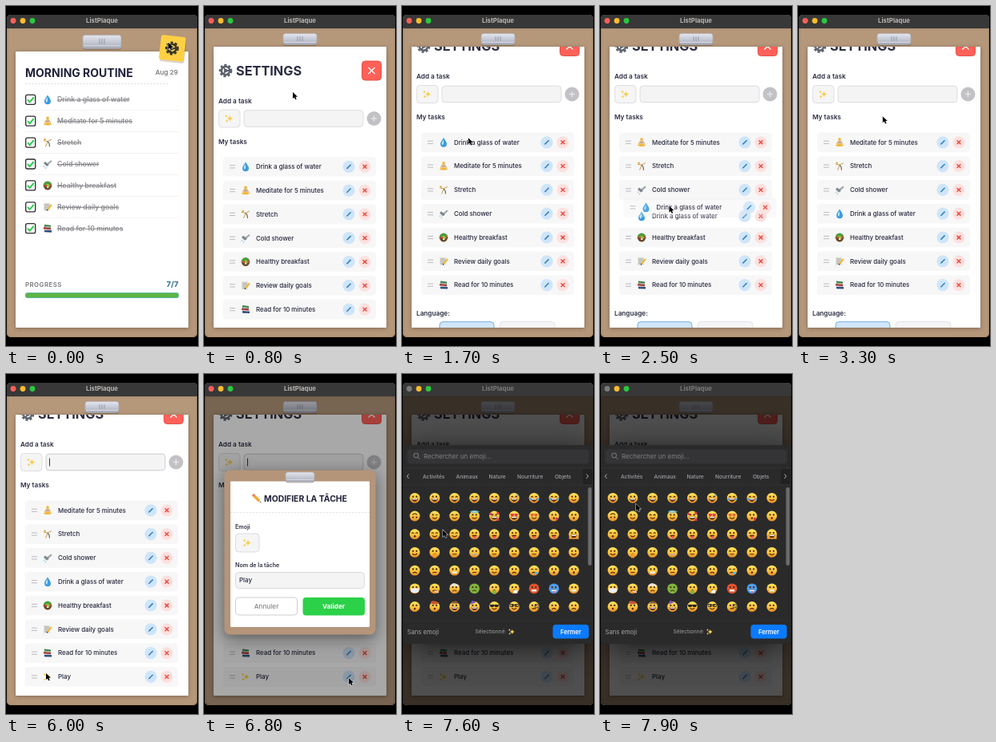
Animation, 240 px wide and 426 px high, one loop 8000 ms. Source, as an HTML page with a canvas:

```html
<!DOCTYPE html>
<html lang="en">
<head>
<meta charset="utf-8">
<title>ListPlaque</title>
<style>
html, body { margin: 0; width: 100%; height: 100%; overflow: hidden; background: #000 }
canvas { display: block; width: 240px; height: 426px }
</style>
</head>
<body>
<canvas id="stage"></canvas>
<script>
const LOOP = 8000, PITCH = 29.8, SCROLL = 30.5;
const canvas = document.getElementById('stage'), c = canvas.getContext('2d');
const dpr = window.devicePixelRatio || 1;
canvas.width = 240 * dpr;
canvas.height = 426 * dpr;

const TASKS = [
  ['drop', 'Drink a glass of water'], ['sit', 'Meditate for 5 minutes'], ['stretch', 'Stretch'],
  ['shower', 'Cold shower'], ['salad', 'Healthy breakfast'], ['memo', 'Review daily goals'],
  ['books', 'Read for 10 minutes']
];

// Each icon is a list of [colour, path, line width (filled when absent)].
const ICONS = {
  drop: [['#3c9be0', 'M0-6C1-3 4-1 4 2A4 4 0 0 1-4 2C-4-1-1-3 0-6'],
    ['#b9e4fb', 'M-.5-3C-2-.5-3 1-2 3C-.5 4 1 1-.5-3']],
  sit: [['#f3b52f', 'M-1.8-3.8a1.8 1.8 0 1 1 3.6 0a1.8 1.8 0 1 1-3.6 0'],
    ['#e9a52b', 'M-1.5-1.5L-3.8 2.5M1.5-1.5L3.8 2.5', 1.1], ['#cfae8a', 'M-1.8-2h3.6l.2 4h-4z'],
    ['#f0b637', 'M-5.5 4Q0 0 5.5 4Q0 6.5-5.5 4']],
  stretch: [['#c99a45', 'M-5-2.5L0-1.5L5-4M0-1L-2.5 5', 1], ['#6a5a40', 'M0-1.5L2 1L2.5 5', 1.1],
    ['#e0a23a', 'M-4.6-4a1.2 1.2 0 1 1 2.4 0a1.2 1.2 0 1 1-2.4 0']],
  shower: [['#9aa3a8', 'M5-4L0 0', 2], ['#7c868b', 'M-3-3L2 1L-1 3L-5-1z'],
    ['#7cc3ea', 'M-4 2l-1 2M-2 4l-1 2', 1]],
  salad: [['#4d9a3d', 'M-5.4 0a5.4 5.4 0 1 1 10.8 0z'], ['#6b4a2c', 'M-5.5 0h11Q4 5.5 0 5.5T-5.5 0'],
    ['#8cc63f', 'M-3.5 1a3.5 3 0 1 1 7 0z'], ['#d8452f', 'M-4-1h3v2h-3zM2-2h2v2h-2z'],
    ['#f5e6b0', 'M-1 1h2.5v2h-2.5z']],
  memo: [['#e4e2d8', 'M-5-5h8v10h-8z'], ['#8b929a', 'M-4-3h6M-4-1h6M-4 1h4M-4 3h3', .7],
    ['#f0b429', 'M5-3L0 3', 2], ['#3d3a36', 'M0 3l-1 1.5', 1.2]],
  books: [['#3f7f4a', 'M-4-5l8 1v3l-8-1z'], ['#a23c36', 'M-5-1.6l9 .8v2.6l-9-.8z'],
    ['#2f4f7c', 'M-4 2l9 .4v2.6l-9-.4z'], ['#ddd', 'M-3-2.6l7 .8M-4 1.2l8 .7', .6]],
  sparkle: [['#f7d057', 'M1-4Q1.6-.6 5 0Q1.6.6 1 4Q.4.6-3 0Q.4-.6 1-4M-3.5-5Q-3.2-3.3-1.5-3Q-3.2-2.7-3.5-1Q-3.8-2.7-5.5-3Q-3.8-3.3-3.5-5M-3 1Q-2.7 2.7-1 3Q-2.7 3.3-3 5Q-3.3 3.3-5 3Q-3.3 2.7-3 1']],
  pencil: [['#f2a633', 'M-3.6-3.6L3 3', 3.4], ['#e6776f', 'M-5-5l1.6 1.6', 3.4], ['#e7c79b', 'M1.8 4l2.2-2.2L5.6 5.6z'],
    ['#333', 'M4 4.8l.8-.8.8 1.6z']]
};

const clamp = v => Math.max(0, Math.min(1, v));
const ease = (t, a, b) => { const k = clamp((t - a) / (b - a)); return k * k * (3 - 2 * k); };

function box(x, y, w, h, r, fill, stroke, lw = 1) {
  c.beginPath();
  c.roundRect(x, y, w, h, r);
  if (fill) { c.fillStyle = fill; c.fill(); }
  if (stroke) { c.strokeStyle = stroke; c.lineWidth = lw; c.stroke(); }
}
function shadowBox(blur, dy, alpha, ...shape) {
  c.save();
  c.shadowColor = `rgba(0,0,0,${alpha})`;
  c.shadowBlur = blur * dpr;
  c.shadowOffsetY = dy * dpr;
  box(...shape);
  c.restore();
}
function text(s, x, y, size, weight, color, align = 'left', spacing = 0) {
  c.font = `${weight} ${size}px Inter, sans-serif`;
  c.letterSpacing = spacing + 'px';
  c.textAlign = align;
  c.fillStyle = color;
  c.fillText(s, x, y + size * .36);
}
function dot(x, y, r, fill) {
  c.beginPath();
  c.arc(x, y, r, 0, 7);
  c.fillStyle = fill;
  c.fill();
}
function path(d, color, width) {
  const p = new Path2D(d);
  c.fillStyle = c.strokeStyle = color;
  c.lineWidth = width || 1;
  width ? c.stroke(p) : c.fill(p);
}
function at(x, y, draw, scale = 1, angle = 0) {
  c.save();
  c.translate(x, y);
  c.scale(scale, scale);
  c.rotate(angle);
  draw();
  c.restore();
}
function fade(alpha, draw) {
  if (alpha <= 0) return;
  c.save();
  c.globalAlpha *= alpha;
  draw();
  c.restore();
}
const icon = (name, x, y, scale = 1) =>
  at(x, y, () => ICONS[name].forEach(([color, d, w]) => path(d, color, w)), scale);
const cross = (x, y, r, color, w) => at(x, y, () => path(`M${-r} ${-r}L${r} ${r}M${r} ${-r}L${-r} ${r}`, color, w));
function dashes(x1, x2, y) {
  c.setLineDash([2.5, 1.5]);
  path(`M${x1} ${y}H${x2}`, '#dcdcdc', .8);
  c.setLineDash([]);
}
function gear(x, y, r, color) {
  at(x, y, () => {
    c.setLineDash([r * .36, r * .267]);
    path(`M${r * .85} 0A${r * .85} ${r * .85} 0 1 1 ${r * .85} -.01`, color, r * .3);
    c.setLineDash([]);
    const q = r * .62;
    path(`M${q} 0A${q} ${q} 0 1 1 ${q} -.01`, color, r * .3);
    path(`M0 0H${q}M0 0L${-q / 2} ${q * .87}M0 0L${-q / 2} ${-q * .87}`, color, r * .22);
    dot(0, 0, r * .28, color);
  });
}
function clip(x, y, w, h, lines) {
  const g = c.createLinearGradient(0, y, 0, y + h);
  g.addColorStop(0, '#e4e6ed');
  g.addColorStop(.55, '#c3c7d3');
  g.addColorStop(1, '#a3a6b2');
  box(x, y + 1.5, w, h, 3, 'rgba(60,40,20,.3)');
  box(x, y, w, h, 3, g, '#a9abb5', .6);
  path(`M${x + 1} ${y + h * .78}H${x + w - 1}`, '#e4e6ee', .8);
  const m = x + w / 2, top = y + h * .27, end = y + h * .66;
  if (lines) path([-3, 0, 3].map(d => `M${m + d} ${top}V${end}`).join(''), '#8d919f', .9);
}
function paper(y) {
  shadowBox(5, 1, .3, 12, y, 216, 403 - y, 1, '#fff');
}

function windowFrame(active) {
  box(1, 11, 238, 404, 5, '#b5977a');
  box(1, 11, 238, 17, [5, 5, 0, 0], '#393838');
  [active ? '#ff5f57' : '#7c7a79', '#febc2e', '#28c840'].forEach((color, i) => dot(9 + 12 * i, 18.5, 3.4, color));
  text('ListPlaque', 120, 18.5, 7.8, 700, active ? '#b9b7b5' : '#7b7a79', 'center');
  box(1.6, 28.5, 236.8, 386, [0, 0, 5, 5], null, '#a5896c', 1.2);
}

function checklist() {
  paper(57);
  clip(96, 36.5, 48, 17, true);
  at(208, 53, () => {
    box(-14.5, -13.5, 31, 31, 3, 'rgba(70,40,0,.2)');
    box(-15.5, -15.5, 31, 31, 3, '#ffd043');
  }, 1, .11);
  gear(207.5, 53, 8.5, '#3c3828');
  text('MORNING ROUTINE', 24, 83.5, 14, 700, '#20223a');
  text('Aug 29', 215, 83.5, 8.2, 500, '#6d6d74', 'right');
  dashes(24, 204, 97.5);
  TASKS.forEach(([name, label], i) => {
    const y = 117.3 + 26.9 * i;
    box(24.7, y - 6, 12, 12, 2, '#fff', '#2c2c30', 1.3);
    path(`M27 ${y}l2.7 3 5-6`, '#2fca50', 2);
    icon(name, 52, y);
    text(label, 64, y, 8.75, 500, '#85858a');
    path(`M64 ${y + .5}h${c.measureText(label).width}`, '#77777c', .9);
    if (i < 6) path(`M24 ${y + 13.4}H216`, '#eeeeef', .8);
  });
  text('PROGRESS', 24, 348.7, 7.8, 600, '#77777d', 'left', .5);
  text('7/7', 215.5, 348.7, 9.6, 700, '#2c6c8c', 'right');
  box(24, 359, 192, 7, 3, '#55b7a2');
  box(24.5, 360, 191, 5, 2.5, '#5db545');
}

function taskRow([name, label], x, y, bg = '#f7f7f8') {
  box(x + 24, y - 12.3, 191, 24.6, 4, bg);
  path(`M${x + 32} ${y - 1.6}h7m-7 3.2h7`, '#b5b5ba', .9);
  icon(name, x + 52, y);
  text(label, x + 65, y, 7.9, 500, '#24263a');
  dot(x + 181, y, 7.6, '#cfe5f9');
  path(`M${x + 178.4} ${y + 2.6}l5.2-5.2`, '#2f7fc4', 1.5);
  dot(x + 201, y, 7.6, '#fde1df');
  cross(x + 201, y, 2.4, '#ee4d43', 1.5);
}

function inputRow(t, y) {
  const typed = t < 5000 ? 'play'.slice(0, Math.max(0, Math.floor((t - 3750) / 130) + 1)) : '';
  const focus = t > 3500;
  box(18.5, y - 11, 26.5, 22, 4, '#f5f5f6', '#dcdce0', .9);
  icon('sparkle', 31.5, y);
  box(50, y - 10.3, 149, 20.6, 4, '#f4f4f5', focus ? '#c6c8cd' : '#dadade', .9);
  text(typed, 54, y, 8, 500, '#24263a');
  const caret = 54.5 + c.measureText(typed).width;
  if (focus && (t + 300) % 1000 < 650) path(`M${caret} ${y - 5}v10`, '#222', .9);
  dot(212.5, y, 9, typed ? '#2fce4c' : '#c2c2c6');
  path(`M209 ${y}h7m-3.5-3.5v7`, typed ? '#fff' : '#e6e6e8', 1.4);
}

function settings(t) {
  const up = SCROLL * ease(t, 1050, 1450), top = 201.3 - up;
  paper(51);
  clip(99, 34.5, 42, 14, true);
  c.save();
  c.beginPath();
  c.rect(12, 51, 216, 352);
  c.clip();
  gear(27, 81 - up, 8.3, '#5d636e');
  text('SETTINGS', 40, 81 - up, 16.3, 700, '#2b2d42');
  box(197.5, 69 - up, 24, 24, 4, '#ff6158', '#e2483f', .9);
  cross(209.5, 81 - up, 4, '#fff', 1.4);
  text('Add a task', 18, 119 - up, 8.2, 600, '#2b2d42');
  inputRow(t, 141 - up);
  text('My tasks', 18, 169.7 - up, 8.2, 600, '#2b2d42');

  const [px, py] = pointer(t), dragging = t > 1900 && t < 2780;
  const dragY = top + py - 169;
  let slot = 0;
  TASKS.forEach((task, i) => {
    if (!i) return;
    const passed = i > 3 ? 0 : t >= 2780 ? 1 : dragging ? clamp((dragY - top - PITCH * (i - .5)) / 7) : 0;
    slot += passed;
    taskRow(task, 0, top + PITCH * (i - passed));
  });
  const held = top + PITCH * slot;
  if (dragging) {
    c.save();
    c.beginPath();
    c.rect(44, held - 12, 180, 26);
    c.clip();
    taskRow(TASKS[0], 0, held + 3, '#fff');
    c.restore();
    fade(.9, () => taskRow(TASKS[0], px - 81, dragY, 'rgba(236,236,238,.35)'));
  } else taskRow(TASKS[0], 0, held);

  const added = ease(t, 5000, 5150);
  fade(added, () => taskRow(['sparkle', 'Play'], 0, top + PITCH * 7));
  const y = 415.5 - up + PITCH * added;
  text('Language:', 18, y, 8.2, 600, '#2b2d42');
  box(47, y + 10.7, 68, 24, 4, '#d2e6f9', '#70aee3', 1);
  box(122, y + 10.7, 69, 24, 4, '#f5f5f6', '#dedee2', .9);
  c.restore();
}

function editDialog() {
  shadowBox(20, 5, .45, 25.5, 120.5, 189, 206, 7, '#b5957a');
  box(33, 134.5, 174, 182.5, 1, '#fff');
  clip(102, 123, 36, 12, false);
  icon('pencil', 66, 156);
  text('MODIFIER LA TÂCHE', 75, 156, 10.4, 700, '#20223a');
  dashes(33, 207, 173.5);
  text('Emoji', 39, 191, 7.1, 600, '#2b2d42');
  box(39.5, 200, 29.5, 23, 4, '#f5f5f6', '#d9d9dd', .9);
  icon('sparkle', 54, 211.5);
  text('Nom de la tâche', 39, 239.7, 7.1, 600, '#2b2d42');
  box(39.5, 248.5, 161, 20, 4, '#f4f4f5', '#d6d6da', .9);
  text('Play', 44, 258.5, 7.9, 500, '#24263a');
  box(39.5, 280, 77, 22, 4, '#fff', '#c9c9ce', .9);
  text('Annuler', 78, 291.2, 8.2, 500, '#85858c', 'center');
  box(123.5, 280, 77.5, 22.5, 4, '#2bd148');
  text('Valider', 162, 291.2, 8.2, 700, '#fff', 'center');
}

// One letter per face: D grin, s smile, t tongue, o kiss, n flat, f frown, g teeth.
const MOUTHS = 'DDDDDDDDs' + 'ssssDDsoo' + 'osstttttD' + 'sonnnnnns' + 'fngnsffoo' + 'nfffoogtg' + 'ooDDssnff';
const SKIN = { 48: '#7fb73c', 51: '#e2532f', 52: '#4d9df0' };
const LIPS = {
  D: ['M-4 .8H4Q3.5 4.6 0 4.6T-4 .8'], s: ['M-3 1.6Q0 4.6 3 1.6', 1.1], n: ['M-2.6 2.4H2.6', 1.1],
  f: ['M-2.5 3.4Q0 1 2.5 3.4', 1.1], o: ['M-1.2 2.6a1.2 1.4 0 1 1 2.4 0a1.2 1.4 0 1 1-2.4 0'],
  t: ['M-3 1H3Q2.5 3.6 0 3.6T-3 1'], g: ['M-3 1.3H3V3.8H-3z']
};
const HEARTS = 'M-4.4-3h4v2l-2 2-2-2zM.4-3h4v2l-2 2-2-2z';
const EXTRAS = {
  5: ['#59b4f0', 'M3.5-5.5l2 3h-3z'], 6: ['#59b4f0', 'M-6 0h2v3h-2zM4 0h2v3h-2z'],
  7: ['#59b4f0', 'M-6 0h2v3h-2zM4 0h2v3h-2z'], 12: ['#55b8ee', 'M-5-5.5Q0-8 5-5.5Q0-3.5-5-5.5', 1.2],
  13: ['#e5394d', 'M-6-4h3v3h-3zM3-5h3v3h-3zM3 3h3v3h-3z'], 14: ['#e5394d', HEARTS],
  15: ['#e5653a', HEARTS], 16: ['#e5394d', 'M2 2h3v2l-1.5 2-1.5-2z'],
  26: ['#f0a832', 'M-6 2h3v4h-3zM3 2h3v4h-3z'], 28: ['#ee9a28', 'M-1 1h3v6h-4z'], 29: ['#e9a02a', 'M-5 4h7v2h-5z'],
  30: ['#bdbdc2', 'M-3 2.3h6', 1.6], 42: ['#59b4f0', 'M1 2h3v3h-3z'], 45: ['#e9eef2', 'M-5 0Q0-1 5 0V4Q0 7-5 4z'],
  46: ['#e8e8ee', 'M0 3l5 2', 1.3], 47: ['#e9e4da', 'M-6-2Q-4-7 0-6.5T6-3L4-2Q0-5-6-2'],
  49: ['#74b83e', 'M-2 2h4v5h-4z'], 50: ['#f3f3f5', 'M-1 2h5v4h-5z'], 52: ['#d9efff', 'M-3 1.5h6v2h-6z'],
  55: ['#c9552e', 'M-5-4Q-5-8 0-7T5-4Q0-2-5-4'], 56: ['#8b5a32', 'M-7-3Q0-5 7-3L4-4Q3-8 0-7T-4-4z'],
  57: ['#7f55c7', 'M-5-3L-3-8L2-5z'], 58: ['#26262a', 'M-5.5-2.5h11v1l-1 2h-3.5l-1-2-1 2h-3.5l-1-2z'],
  59: ['#333', 'M-5-3h4v3h-4zM1-3h4v3h-4zM-1-2h2', .9], 60: ['#555', 'M1-3h4v4h-4zM5 0v5', .9]
};
const SQUINTS = [2, 3, 4, 5, 6, 7, 11, 18, 19, 20, 25, 33, 40, 42];

function face(i) {
  const g = c.createLinearGradient(0, -6, 0, 6.5);
  g.addColorStop(0, SKIN[i] || '#ffe25c');
  g.addColorStop(.5, SKIN[i] || '#fcc63f');
  g.addColorStop(1, SKIN[i] || '#e58a25');
  dot(0, 0, 6.4, g);
  c.save();
  if (i === 9) c.rotate(Math.PI);
  const ink = '#55290d', kind = MOUTHS[i];
  if (SQUINTS.includes(i)) path('M-3.8-.8q1.3-2.2 2.6 0M1.2-.8q1.3-2.2 2.6 0', ink, 1.1);
  else [-2.2, 2.2].forEach((x, k) => i === 10 && k ? path('M1-1.4h2.5', ink, 1) : dot(x, -1.6, 1.15, ink));
  path(LIPS[kind][0], kind === 'g' ? '#f4f0e4' : ink, LIPS[kind][1]);
  if (kind === 'D') path('M-3.4 1H3.4L3 2.2H-3z', '#fff');
  if (kind === 't') path('M-1 2.2h2.8v2.6q-1.4 1.4-2.8 0z', '#ee5572');
  if (EXTRAS[i]) path(EXTRAS[i][1], EXTRAS[i][0], EXTRAS[i][2]);
  c.restore();
}

function picker() {
  shadowBox(40, 4, .6, 1, 89, 238, 249, 6, '#2a2a2b');
  box(6.5, 94.5, 227, 18, 4, '#343436');
  path('M20.5 102a2.9 2.9 0 1 1-5.8 0a2.9 2.9 0 1 1 5.8 0M19.8 104.3l2.5 2.6', '#87878b', .9);
  text('Rechercher un emoji...', 27, 103.3, 8, 400, '#808084');
  path('M1 117.5H239M1 139H239M1 309H239', '#363638', .7);
  box(226, 119, 12, 19, 2, '#222223');
  path('M8.5 125.5l-2.3 2.7 2.3 2.7M230.5 125.5l2.3 2.7-2.3 2.7', '#b4b4b8', 1);
  [['Activités', 26], ['Animaux', 67.5], ['Nature', 108.5], ['Nourriture', 144], ['Objets', 191]]
    .forEach(([label, x]) => text(label, x, 128.2, 6.6, 500, '#a2a2a6'));
  for (let i = 0; i < 63; i++) at(16 + 24.85 * (i % 9), 155.3 + 22.7 * Math.floor(i / 9), () => face(i));
  box(232.5, 142, 4.5, 98, 2.2, '#6b6b6e');
  text('Sans emoji', 6.5, 323, 7.7, 400, '#a4a4a8');
  text('Sélectionné:', 91.5, 323, 6.7, 400, '#a4a4a8');
  icon('sparkle', 137, 323, .75);
  box(188.5, 314, 45, 17.5, 4, '#0a7aff');
  text('Fermer', 211, 323, 7.6, 600, '#fff', 'center');
}

const MOVES = [
  [0, 203, 46], [350, 203, 46], [800, 111, 108], [1150, 111, 108], [1800, 81, 169], [1950, 81, 169],
  [2500, 86.5, 250.5], [2780, 87, 257], [2900, 87, 257], [3450, 110, 112], [4500, 110, 112], [4900, 211, 111],
  [5150, 211, 111], [5850, 50, 375], [6050, 50, 375], [6500, 181, 381], [6900, 181, 381],
  [7250, 54, 211], [7450, 54, 211], [7850, 45, 163], [8000, 45, 163]
];
function pointer(t) {
  const n = MOVES.findIndex(m => m[0] > t), a = MOVES[n - 1], b = MOVES[n], k = ease(t, a[0], b[0]);
  return [a[1] + (b[1] - a[1]) * k, a[2] + (b[2] - a[2]) * k];
}
function drawPointer(t) {
  if (t > 3750 && t < 4500) return;
  at(...pointer(t), () => {
    const arrow = 'M0 0V9L2.1 7.1L3.6 10.4L5.2 9.7L3.8 6.5H6.6z';
    path(arrow, 'rgba(255,255,255,.75)', 1.2);
    path(arrow, '#000');
  }, .9);
}

function draw(t) {
  const modal = ease(t, 6580, 6740), sheet = ease(t, 7450, 7600);
  c.setTransform(dpr, 0, 0, dpr, 0, 0);
  c.fillStyle = '#000';
  c.fillRect(0, 0, 240, 426);
  windowFrame(sheet < .5);
  t < 400 ? checklist() : settings(t);

  c.save();
  c.beginPath();
  c.roundRect(1, 28, 238, 387, [0, 0, 5, 5]);
  c.clip();
  fade(modal, () => {
    box(1, 28, 238, 387, 0, 'rgba(0,0,0,.34)');
    at(120, 224, () => { c.translate(-120, -224); editDialog(); }, .94 + .06 * modal);
  });
  fade(sheet, () => {
    box(1, 28, 238, 387, 0, 'rgba(0,0,0,.53)');
    at(0, 30 * (1 - sheet), picker);
  });
  c.restore();
  drawPointer(t);
}

function tick(now) {
  draw(now % LOOP);
  requestAnimationFrame(tick);
}
requestAnimationFrame(tick);
</script>
</body>
</html>
```
